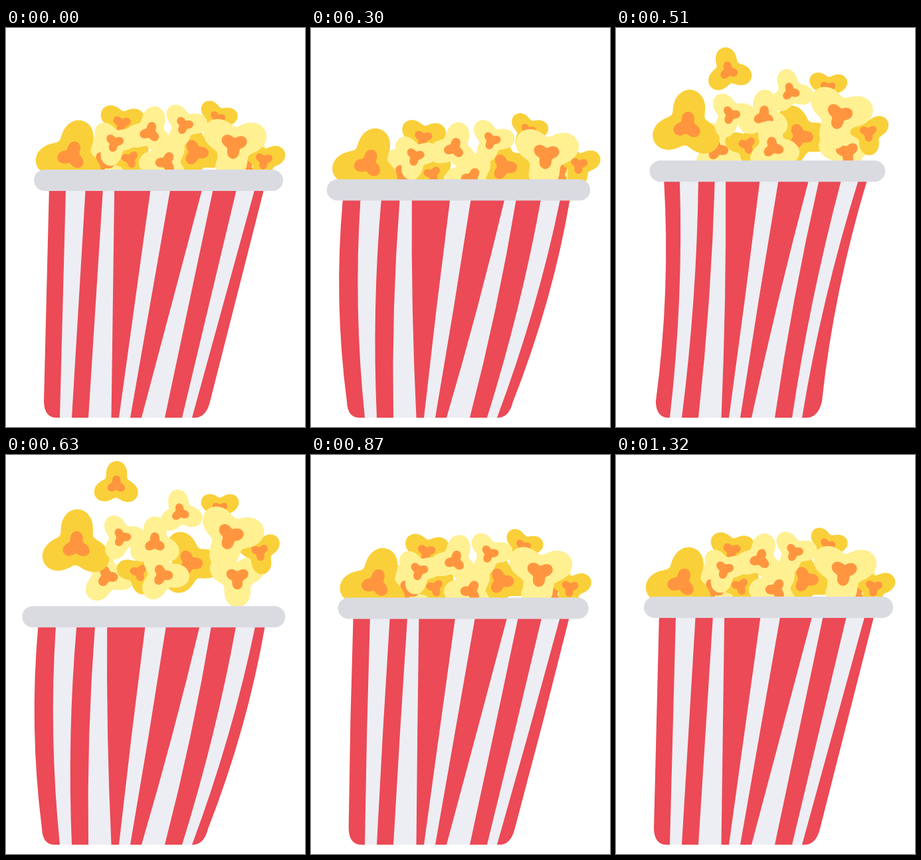
Write an HTML page with a canvas that moves like this. It is 450 px wide and 600 px high and loops after 1350 ms.

```html
<!DOCTYPE html>
<html lang="en">
<head>
<meta charset="utf-8">
<title>Popcorn</title>
<style>
  html, body { margin: 0; width: 100%; height: 100%; overflow: hidden; background: #fff; }
  canvas { display: block; width: 450px; height: 600px; }
</style>
</head>
<body>
<canvas id="stage" width="450" height="600"></canvas>
<script>
const ctx = document.getElementById('stage').getContext('2d');
const LOOP = 1350, STEP = 30;
const RED = '#eb4a56', WHITE = '#edeef4', RIM = '#dadbe1';
const DARK = '#f9d039', LIGHT = '#fff092', ORANGE = '#ff963f';

const mix = (a, b, k) => a + (b - a) * k;
const rad = deg => deg * Math.PI / 180;

// Squash of the bucket over time: 1 is flat and wide, -1 is tall and narrow
const squashKeys = [[0, 0], [300, 1], [495, -1], [640, 1], [930, 0], [LOOP, 0]];

function squashAt(t) {
  const i = squashKeys.findIndex(([time]) => time > t);
  const [t0, a] = squashKeys[i - 1], [t1, b] = squashKeys[i];
  return mix(a, b, (1 - Math.cos(Math.PI * (t - t0) / (t1 - t0))) / 2);
}

// Stripe edges: share of the rim width at the top, x at the bottom
const edgeShare = [0.061, 0.128, 0.207, 0.277, 0.323, 0.468, 0.547, 0.675, 0.719, 0.813, 0.886, 0.923];
const edgeFoot = [57, 81, 99, 124, 158.5, 170, 187, 204, 239, 265, 280, 307];
const BOTTOM = 586, CORNER = 562, RIM_HEIGHT = 32;

function drawBucket(s) {
  const width = 375 + 21.5 * s;
  const left = 229.5 - 2.75 * s - 4.75 * s * s - width / 2;
  const rimY = 213 + 14.5 * s;
  const neck = rimY + RIM_HEIGHT - 2;

  // Each edge is a curve that bows outwards as the bucket is squashed
  const edges = edgeShare.map((share, i) => {
    const outer = i === 0 || i === edgeShare.length - 1;
    const foot = edgeFoot[i] - (outer ? 3 * s : 0);
    const footY = outer ? CORNER : BOTTOM;
    const top = left + share * width;
    const bow = 17 * s * (i / 5.5 - 1);
    return { top, foot, footY, midX: (top + foot) / 2 + bow, midY: (neck + footY) / 2 };
  });
  const down = e => {
    ctx.moveTo(e.top, neck);
    ctx.quadraticCurveTo(e.midX, e.midY, e.foot, e.footY);
  };
  const up = e => {
    ctx.lineTo(e.foot, e.footY);
    ctx.quadraticCurveTo(e.midX, e.midY, e.top, neck);
  };
  const first = edges[0], last = edges[edges.length - 1];

  ctx.beginPath();
  down(first);
  ctx.quadraticCurveTo(first.foot + 1, BOTTOM, first.foot + 19, BOTTOM);
  ctx.lineTo(last.foot - 23, BOTTOM);
  ctx.quadraticCurveTo(last.foot - 6, BOTTOM, last.foot, CORNER);
  up(last);
  ctx.fillStyle = RED;
  ctx.fill();

  ctx.fillStyle = WHITE;
  for (let i = 1; i < edges.length - 1; i += 2) {
    ctx.beginPath();
    down(edges[i]);
    up(edges[i + 1]);
    ctx.fill();
  }

  ctx.fillStyle = RIM;
  ctx.beginPath();
  ctx.roundRect(left, rimY, width, RIM_HEIGHT, RIM_HEIGHT / 2);
  ctx.fill();
}

// Each kernel hops from its seat to its peak; tilt aims a lobe at the peak,
// turn is the extra rotation in the seat. Listed from back to front.
const kernels = [];
const kernel = (color, reach, tilt, turn, seat, peak) =>
  kernels.push({ color, reach, tilt, turn, seat, peak });

kernel(DARK, 36, 32, -54, [174, 144], [166, 44]);
kernel(LIGHT, 42, 7, 0, [146, 203], [152, 182]);
kernel(DARK, 55, 32, 16, [99, 192], [106, 136]);
kernel(DARK, 34, 74, 0, [187, 197], [200, 176]);
kernel(DARK, 31, 90, 20, [318, 136], [322, 80]);
kernel(DARK, 50, 3, 0, [285, 187], [276, 162]);
kernel(LIGHT, 45, 90, -30, [360, 208], [348, 184]);
kernel(DARK, 34, 82, 15, [388, 199], [382, 145]);
kernel(LIGHT, 40, 30, 15, [217, 157], [224, 132]);
kernel(LIGHT, 35, 21, -28, [268, 146], [262, 86]);
kernel(LIGHT, 41, 3, 55, [241, 202], [235, 180]);
kernel(LIGHT, 36, 118, -13, [163, 172], [174, 123]);
kernel(LIGHT, 52, 109, -13, [343, 176], [337, 121]);

// Smooth three-lobed outline
function clover(color, reach) {
  ctx.fillStyle = color;
  ctx.beginPath();
  for (let a = 0; a < 360; a += 5) {
    const r = reach * Math.sqrt(0.64 + 0.36 * Math.cos(rad(3 * a)));
    ctx.lineTo(r * Math.cos(rad(a)), r * Math.sin(rad(a)));
  }
  ctx.fill();
}

function drawKernel({ color, reach, tilt, turn, seat, peak }, s, lift) {
  // Seats spread sideways near the walls and sink most in the middle
  const side = (seat[0] - 230) / 187;
  const x = mix(seat[0] + 18 * side * s, peak[0], lift);
  const y = mix(seat[1] + 24 * (1 - side * side) * s, peak[1], lift);
  ctx.save();
  ctx.translate(x, y);
  ctx.rotate(rad(tilt + turn * (1 - lift)));
  clover(color, reach);
  clover(ORANGE, reach * 0.4);
  ctx.restore();
}

function frame(now) {
  const t = Math.floor((now % LOOP) / STEP) * STEP;
  const s = squashAt(t);
  const lift = Math.max(0, 1 - ((t - 612) / 200) ** 2);
  ctx.fillStyle = '#fff';
  ctx.fillRect(0, 0, 450, 600);
  kernels.forEach(k => drawKernel(k, s, lift));
  drawBucket(s);
  requestAnimationFrame(frame);
}
requestAnimationFrame(frame);
</script>
</body>
</html>
```
